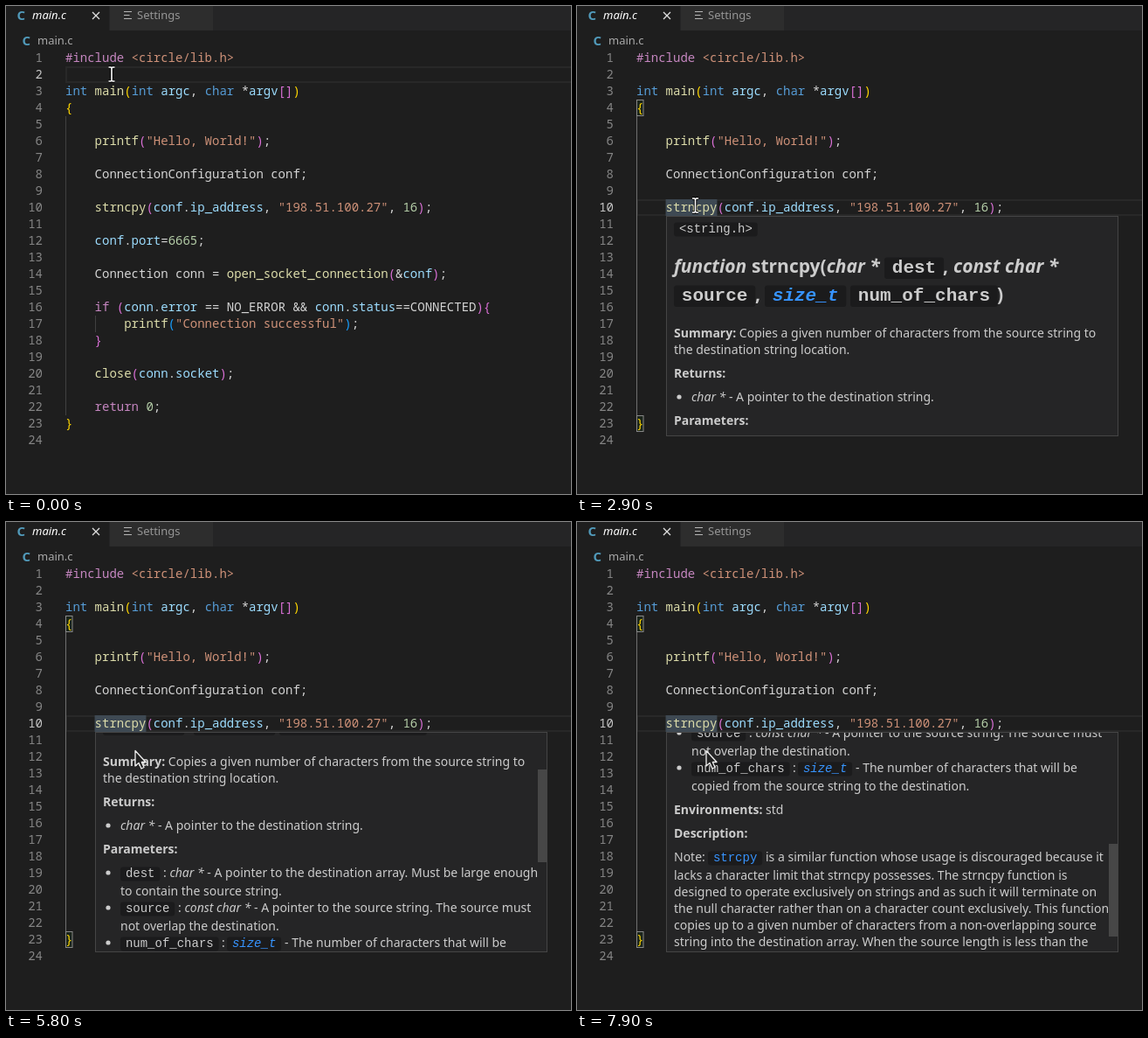
An HTML page for the animation above (8000 ms loop, 647 by 558 pixels).

```html
<!DOCTYPE html>
<html lang="en">
<head>
<meta charset="utf-8">
<title>Editor hover documentation</title>
<style>
html, body { margin: 0; width: 100%; height: 100%; overflow: hidden; background: #1e1e1e; }
svg { display: block; width: 647px; height: 558px; }
text { white-space: pre; font: 14px "Noto Sans", sans-serif; fill: #ccc; }
.ui { font-size: 13px; }
.icon { font: bold 15px "Noto Sans", sans-serif; fill: #519aba; }
.code { font-family: "Noto Sans Mono", monospace; font-variant-ligatures: none; }
.mono { font-family: "Liberation Mono", monospace; }
.big { font-size: 21px; font-weight: bold; }
.b { font-weight: bold; }
.i { font-style: italic; }
.link { fill: #3794ff; font-style: italic; }
.ref { fill: #3794ff; }
</style>
</head>
<body>
<svg id="stage" viewBox="0 0 647 558"></svg>
<script>
const stage = document.getElementById('stage');
const LOOP = 8000, CHAR = 8.4, LINE = 19, LEFT = 68;

function el(name, attrs, parent = stage, text) {
  const node = document.createElementNS('http://www.w3.org/2000/svg', name);
  for (const key in attrs) node.setAttribute(key, attrs[key]);
  if (text) node.textContent = text;
  parent.append(node);
  return node;
}
const rect = (x, y, width, height, fill, parent, extra) =>
  el('rect', { x, y, width, height, fill, ...extra }, parent);
const label = (x, y, text, cls, fill, parent) =>
  el('text', { x, y, class: cls, ...(fill && { style: 'fill:' + fill }) }, parent, text);
const show = (node, on) => node.setAttribute('visibility', on ? 'visible' : 'hidden');
const lineTop = n => 50 + LINE * (n - 1);

// Tabs and breadcrumb
rect(0, 0, 647, 28, '#252526');
rect(0, 0, 118, 28, '#1e1e1e');
rect(119, 0, 118, 28, '#2d2d2d');
label(12.5, 16, 'C', 'icon');
label(30, 15, 'main.c', 'ui i', '#fff');
el('path', { d: 'M99 7l8 8m0-8l-8 8', stroke: '#e0e0e0', 'stroke-width': 1.3 });
el('path', { d: 'M135 6.5h9M135 10.5h6.5M135 14.5h9', stroke: '#b5b5b5', 'stroke-width': 1.2 });
label(150, 15, 'Settings', 'ui', '#969696');
label(18.5, 45, 'C', 'icon');
label(36, 44, 'main.c', 'ui', '#a9a9a9');

// Code: each piece starts with its colour key
const COLORS = {
  p: '#c586c0', s: '#ce9178', k: '#569cd6', f: '#dcdcaa', v: '#9cdcfe',
  d: '#d4d4d4', n: '#b5cea8', g: '#ffd700', o: '#da70d6', u: '#179fff'
};
const CODE = [
  'p#include |s<circle/lib.h>',
  '',
  'kint |fmain|g(|kint |vargc|d, |kchar |d*|vargv|o[]|g)',
  'g{',
  '',
  'f    printf|o(|s"Hello, World!"|o)|d;',
  '',
  'd    ConnectionConfiguration conf;',
  '',
  'f    strncpy|o(|vconf|d.|vip_address|d, |s"198.51.100.27"|d, |n16|o)|d;',
  '',
  'v    conf|d.|vport|d=|n6665|d;',
  '',
  'd    Connection conn = |fopen_socket_connection|o(|d&|vconf|o)|d;',
  '',
  'p    if |o(|vconn|d.|verror|d == NO_ERROR && |vconn|d.|vstatus|d==CONNECTED|o){',
  'f        printf|u(|s"Connection successful"|u)|d;',
  'o    }',
  '',
  'f    close|o(|vconn|d.|vsocket|o)|d;',
  '',
  'p    return |n0|d;',
  'g}',
  ''
];

const lineBox = rect(69, 0, 590, LINE - 2, 'none', stage, { stroke: '#282828', 'stroke-width': 2 });
const guide = rect(LEFT, lineTop(5), 1, LINE * 18, '#404040');
rect(102, lineTop(17), 1, LINE, '#404040');

const word = rect(LEFT + 4 * CHAR, lineTop(10), 7 * CHAR, LINE, '#474747');
const wordTint = rect(LEFT + 4 * CHAR, lineTop(10), 7 * CHAR, LINE, '#264f78', stage, { opacity: .25 });
const braces = el('g');
for (const n of [4, 23])
  rect(LEFT + .5, lineTop(n) + .5, 7.5, LINE - 1, '#1b251b', braces, { stroke: '#888' });

const numbers = CODE.map((line, i) => {
  const y = lineTop(i + 1) + 14;
  const row = label(LEFT, y, '', 'code');
  for (const part of line.split('|'))
    if (part) el('tspan', { fill: COLORS[part[0]] }, row, part.slice(1));
  const num = label(42, y, String(i + 1), 'code');
  num.setAttribute('text-anchor', 'end');
  return num;
});
const caret = rect(LEFT, 0, 2, LINE, '#aeafad');

// Hover popup
const popup = el('g');
rect(102.5, 240.5, 517, 251, '#252526', popup, { stroke: '#454545' });
const clip = el('clipPath', { id: 'clip' });
rect(103, 241, 516, 250, '#000', clip);
const view = el('g', { 'clip-path': 'url(#clip)' }, popup);
const doc = el('g', {}, view);

// Runs of text: a leading * is bold, a leading _ is italic
function row(x, y, runs, cls = '') {
  const node = label(x, y, '', cls, '', doc);
  for (const run of runs.split('|')) {
    const style = { '*': 'b', _: 'i' }[run[0]];
    el('tspan', style ? { class: style } : {}, node, style ? run.slice(1) : run);
  }
}
function pill(x, y, text, cls = '', size = 14) {
  const pad = size * .42;
  rect(x, y - size * .83, text.length * size * .6 + pad * 2, size * 1.16, '#1b1b1c', doc, { rx: 3 });
  label(x + pad, y, text, 'mono ' + cls, '', doc);
}
const bullet = y => el('circle', { cx: 117, cy: y - 5, r: 2.6, fill: '#ccc' }, doc);

pill(111, 259, '<string.h>');
row(111, 305, '_function', 'big');
row(200, 305, 'strncpy(|_char *', 'big');
pill(352, 305, 'dest', 'big', 21);
row(419, 305, ',', 'big');
row(431, 305, '_const char *', 'big');
pill(111, 337, 'source', 'big', 21);
row(204, 337, ',', 'big');
pill(215, 337, 'size_t', 'big link', 21);
pill(313, 337, 'num_of_chars', 'big', 21);
row(481, 337, ')', 'big');

row(111, 379, '*Summary:| Copies a given number of characters from the source string to');
row(111, 398, 'the destination string location.');
row(111, 425, '*Returns:');
bullet(452);
row(131, 452, '_char *| - A pointer to the destination string.');
row(111, 479, '*Parameters:');
bullet(506);
pill(131, 506, 'dest');
row(180, 506, ': |_char *| - A pointer to the destination array. Must be large enough');
row(131, 527, 'to contain the source string.');
bullet(546);
pill(131, 546, 'source');
row(197, 546, ': |_const char *| - A pointer to the source string. The source must');
row(131, 567, 'not overlap the destination.');
bullet(586);
pill(131, 586, 'num_of_chars');
row(247, 586, ':');
pill(253, 586, 'size_t', 'link');
row(319, 586, '- The number of characters that will be');
row(131, 607, 'copied from the source string to the destination.');
row(111, 634, '*Environments:| std');
row(111, 661, '*Description:');
row(111, 688, 'Note:');
pill(150, 688, 'strcpy', 'ref');
row(216, 688, 'is a similar function whose usage is discouraged because it');
[
  'lacks a character limit that strncpy possesses. The strncpy function is',
  'designed to operate exclusively on strings and as such it will terminate on',
  'the null character rather than on a character count exclusively. This function',
  'copies up to a given number of characters from a non-overlapping source',
  'string into the destination array. When the source length is less than the'
].forEach((text, i) => row(111, 709 + LINE * i, text));
const thumb = rect(609, 241, 10, 106, '#474747', popup);

// Pointers
const beam = el('g', { fill: 'none' });
const BEAM = 'M-3.5-8H-1L0-7L1-8H3.5M0-7V7M-3.5 8H-1L0 7L1 8H3.5';
el('path', { d: BEAM, stroke: '#000', 'stroke-width': 3.6 }, beam);
el('path', { d: BEAM, stroke: '#fff', 'stroke-width': 1.6 }, beam);
const arrow = el('path', {
  d: 'M0 0V17.5L4 14L7 20.5L10 19L7.3 13H12Z',
  fill: '#222', stroke: '#eee', 'stroke-width': 1.3, 'stroke-linejoin': 'round'
});

// Time, x, y
const PATH = [
  [100, 121, 78], [500, 132, 140], [900, 151, 226], [1000, 148, 229], [1200, 135, 232],
  [1900, 135, 232], [2200, 153, 240], [2400, 135.5, 228],
  [3200, 135.5, 228], [3700, 146, 248], [4100, 148, 261.5], [LOOP, 148, 261.5]
];
const CLICK = 1100, HOVER = 2600;
const WHEEL = [4800, 5500, 6100, 6700, 7300, 7900];

function pointerAt(t) {
  if (t <= PATH[0][0]) return PATH[0].slice(1);
  const i = PATH.findIndex(p => p[0] >= t);
  const [t0, x0, y0] = PATH[i - 1], [t1, x1, y1] = PATH[i];
  const k = (t - t0) / (t1 - t0);
  return [x0 + (x1 - x0) * k, y0 + (y1 - y0) * k];
}
function caretOn(t) {
  if (t < CLICK) return t >= 200 && t < 700;
  if (t < 3300) return t < 1700 || (t >= 2200 && t < 2700);
  return (t - 3300) % 1000 < 500;
}

function draw(t) {
  const clicked = t >= CLICK, current = clicked ? 10 : 2;
  lineBox.setAttribute('y', lineTop(current) + 1);
  numbers.forEach((n, i) => { n.style.fill = i + 1 === current ? '#c6c6c6' : '#858585'; });
  guide.setAttribute('fill', clicked ? '#707070' : '#404040');
  show(braces, clicked);
  show(word, t >= 1400);
  show(wordTint, t >= HOVER);

  caret.setAttribute('x', clicked ? 134 : LEFT);
  caret.setAttribute('y', lineTop(current));
  show(caret, caretOn(t));

  const [x, y] = pointerAt(t);
  const inside = t > HOVER && y > 241;
  show(beam, !inside);
  show(arrow, inside);
  (inside ? arrow : beam).setAttribute('transform', `translate(${x} ${y})`);

  const scroll = 50 * WHEEL.filter(w => t >= w).length;
  popup.setAttribute('opacity', t < HOVER ? 0 : t < HOVER + 100 ? .4 : 1);
  doc.setAttribute('transform', `translate(0 ${-scroll})`);
  thumb.setAttribute('y', 241 + Math.round(scroll * .424));
  show(thumb, inside);
}

const start = performance.now();
function tick() {
  const t = (performance.now() - start) % LOOP;
  draw(Math.floor(t / 100) * 100);
  requestAnimationFrame(tick);
}
tick();
</script>
</body>
</html>
```
